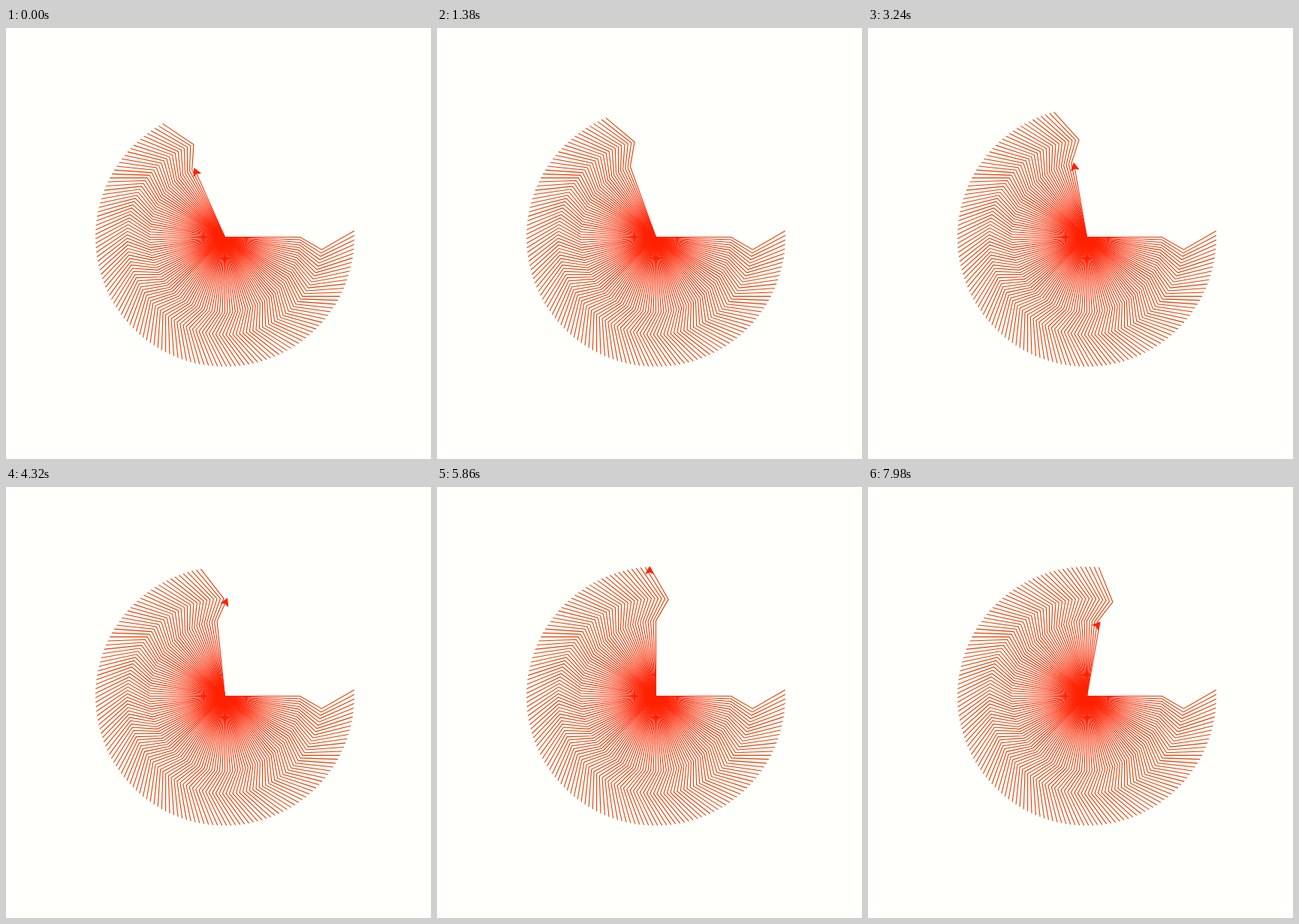
Recreate the animation shown at these times as an HTML page with a canvas. Size 566x574 px, loop 8000 ms.

```html
<!DOCTYPE html>
<html lang="en">
<head>
<meta charset="utf-8">
<title>Turtle fan</title>
<style>
  html, body { margin: 0; width: 100%; height: 100%; overflow: hidden; background: #fffffc; }
  canvas { display: block; }
</style>
</head>
<body>
<canvas id="stage" width="566" height="574"></canvas>
<script>
const ctx = document.getElementById('stage').getContext('2d');
const LOOP = 8000;
const CX = 291.5, CY = 278.5;
const FIRST_ARM = 123;   // arm in progress when the loop starts
const ARM_STEP = 2;      // degrees between arms, clockwise
const MOVES = 10;        // turtle commands per arm
const rad = deg => deg * Math.PI / 180;

// One arm: forward, right 30, forward, left 60, forward, right 30.
const joints = [[0, 0]];
for (const [turn, len] of [[0, 100], [30, 100 / 3], [-30, 50]]) {
  const [x, y] = joints[joints.length - 1];
  joints.push([x + len * Math.cos(rad(turn)), y + len * Math.sin(rad(turn))]);
}

// Joint reached and heading offset after each command; then
// pen up, go to the centre, pen down and turn to the next arm.
const POSES = [
  [1, 0], [1, 30], [2, 30], [2, -30], [3, -30],
  [3, 0], [3, 0], [0, 0], [0, 0], [0, ARM_STEP]
];

const ink = ctx.createRadialGradient(0, 0, 35, 0, 0, 110);
ink.addColorStop(0, '#ff2000');
ink.addColorStop(1, '#e03c00');

// Commands come in threes: holds of 100, 20 and 20 ms.
function commandAt(t) {
  if (t < 20) return 0;
  const u = t - 20, r = u % 140;
  return 3 * Math.floor(u / 140) + 1 + (r >= 100) + (r >= 120);
}

function drawArm(n, segments) {
  ctx.save();
  ctx.rotate(rad(n * ARM_STEP));
  ctx.beginPath();
  for (const [x, y] of joints.slice(0, segments + 1)) ctx.lineTo(x, y);
  ctx.stroke();
  ctx.restore();
}

function drawTurtle(n, joint, turn) {
  ctx.save();
  ctx.rotate(rad(n * ARM_STEP));
  ctx.translate(...joints[joint]);
  ctx.rotate(rad(turn));
  ctx.beginPath();
  for (const [x, y] of [[0, 0], [-9, -5], [-7, 0], [-9, 5]]) ctx.lineTo(x, y);
  ctx.closePath();
  ctx.fillStyle = ctx.strokeStyle = '#ff2000';
  ctx.lineJoin = 'round';
  ctx.fill();
  ctx.stroke();
  ctx.restore();
}

function draw(t) {
  const command = commandAt(t);
  const arm = FIRST_ARM + Math.floor(command / MOVES);
  const phase = command % MOVES;

  ctx.setTransform(1, 0, 0, 1, 0, 0);
  ctx.fillStyle = '#fffffc';
  ctx.fillRect(0, 0, 566, 574);
  ctx.translate(CX, CY);
  ctx.strokeStyle = ink;
  ctx.lineWidth = 1.1;
  for (let n = 0; n < arm; n++) drawArm(n, 3);
  drawArm(arm, Math.min(3, 1 + Math.floor(phase / 2)));
  drawTurtle(arm, ...POSES[phase]);
}

const start = performance.now();
function tick() {
  draw((performance.now() - start) % LOOP);
  requestAnimationFrame(tick);
}
tick();
</script>
</body>
</html>
```
